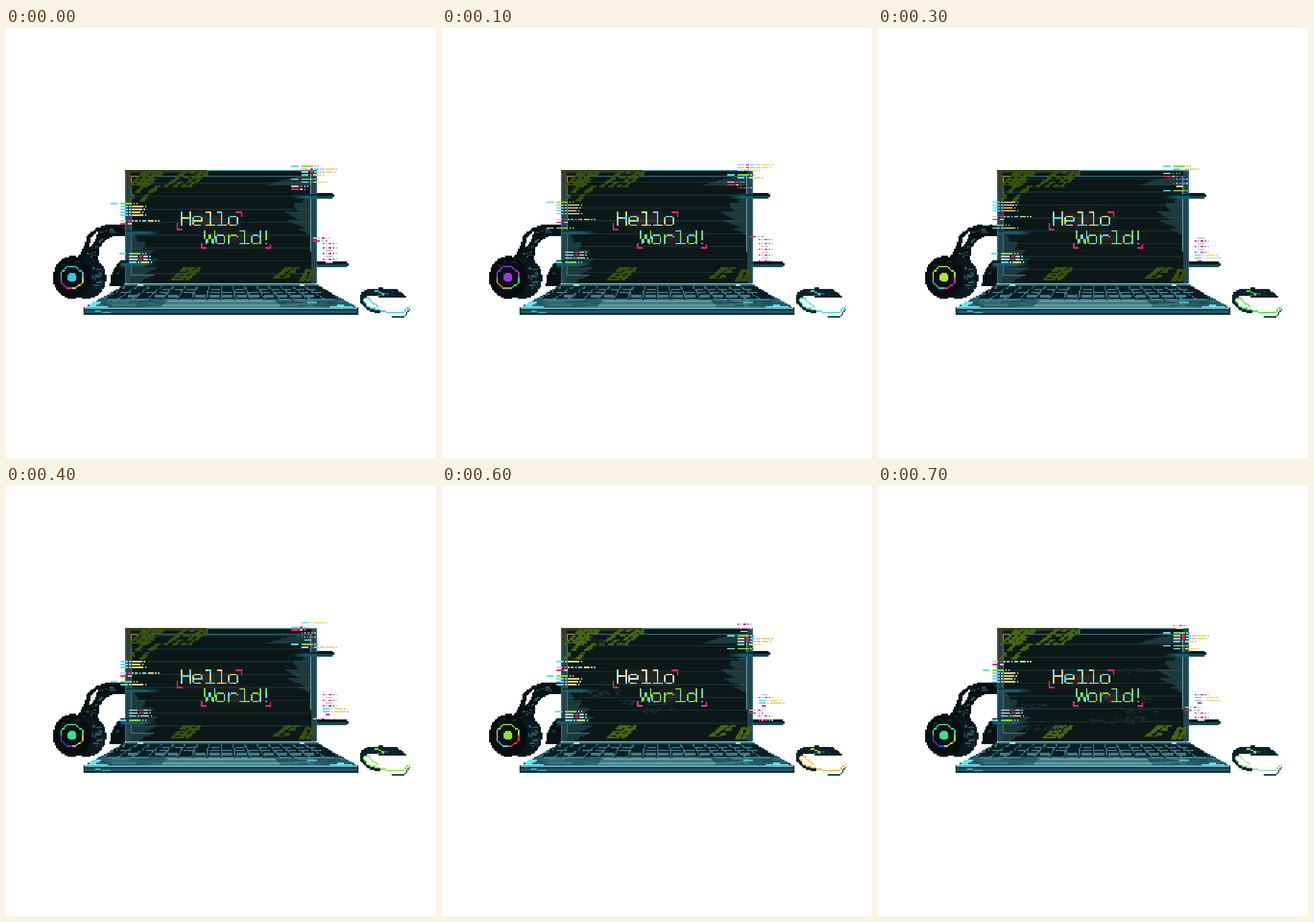
Write an HTML page with a canvas that moves like this. It is 748 by 748 pixels and loops after 0.8 s.

```html
<!DOCTYPE html>
<html lang="en">
<head>
<meta charset="utf-8">
<title>Hello World</title>
<style>
  html, body { margin: 0; width: 100%; height: 100%; overflow: hidden; background: #fff; }
  canvas { display: block; width: 100vw; height: 100vh; image-rendering: pixelated; }
</style>
</head>
<body>
<canvas id="stage" width="300" height="300" role="img" aria-label="Hello World!"></canvas>
<script>
const N = 300, U = 748 / N, STEPS = 8;
const view = document.getElementById('stage').getContext('2d');
const still = document.createElement('canvas');
still.width = still.height = N;
let g = still.getContext('2d');

let seed = 7;
const rnd = () => (seed = (seed * 16807) % 2147483647) / 2147483647;
const pick = list => list[Math.floor(rnd() * list.length)];
const cell = v => Math.round(v / U);
const dot = (c, x, y, w = 1, h = 1) => { g.fillStyle = c; g.fillRect(x, y, w, h); };
const parse = s => s.split(' ').map(p => p.split(',').map(v => v / U));

// Shapes take stage pixels and snap to the coarse grid.
function box(c, x0, y0, x1, y1) {
  const x = cell(x0), y = cell(y0);
  dot(c, x, y, Math.max(1, cell(x1) - x), Math.max(1, cell(y1) - y));
}
function spans(pts, put) {
  const ys = pts.map(p => p[1]);
  for (let y = Math.floor(Math.min(...ys)); y <= Math.max(...ys); y++) {
    const hits = [], m = y + .5;
    pts.forEach(([x0, y0], i) => {
      const [x1, y1] = pts[(i + 1) % pts.length];
      if ((y0 <= m) !== (y1 <= m)) hits.push(x0 + (m - y0) / (y1 - y0) * (x1 - x0));
    });
    hits.sort((a, b) => a - b);
    for (let i = 0; i + 1 < hits.length; i += 2) put(Math.round(hits[i]), Math.round(hits[i + 1]), y);
  }
}
const poly = (c, s) => spans(parse(s), (a, b, y) => dot(c, a, y, b - a));
// Random horizontal streaks inside a polygon.
function grain(colors, s, density, len) {
  spans(parse(s), (a, b, y) => {
    for (let x = a; x < b; x++) if (rnd() < density) {
      const w = Math.min(b - x, 1 + Math.floor(rnd() * len));
      dot(pick(colors), x, y, w);
      x += w;
    }
  });
}
function line(c, s, w = 1) {
  const pts = parse(s);
  for (let i = 1; i < pts.length; i++) {
    const [x0, y0] = pts[i - 1], [x1, y1] = pts[i];
    const n = Math.max(1, Math.ceil(Math.max(Math.abs(x1 - x0), Math.abs(y1 - y0))));
    for (let k = 0; k <= n; k++)
      dot(c, Math.floor(x0 + (x1 - x0) * k / n), Math.floor(y0 + (y1 - y0) * k / n), w, w);
  }
}
function disc(c, x, y, rx, ry = rx) {
  x /= U; y /= U; rx /= U; ry /= U;
  for (let j = Math.floor(y - ry); j <= y + ry; j++) {
    const d = 1 - ((j + .5 - y) / ry) ** 2;
    if (d <= 0) continue;
    const h = rx * Math.sqrt(d), a = Math.round(x - h);
    dot(c, a, j, Math.round(x + h) - a);
  }
}
// Slanted teeth growing from a vertical edge; a negative reach points left.
function teeth(c, x, y0, y1, reach) {
  const n = cell(y1) - cell(y0), dir = Math.sign(reach);
  for (let k = 0; k < n; k++) {
    const bulge = Math.sin(Math.PI * (k + 1) / (n + 1)), tooth = (k * .17) % 1;
    const w = cell(Math.abs(reach) * bulge * (1 - .55 * tooth));
    dot(c, dir > 0 ? cell(x) : cell(x) - w, cell(y0) + k, w);
  }
}

function headphones() {
  poly('#081115', '180,450 182,432 190,416 200,405 208,403 208,450');
  grain(['#1b3c46', '#132b33'], '186,425 197,408 208,405 208,425 195,432', .15, 4);
  poly('#081115', '122,404 136,380 141,362 155,349 174,342 208,341 208,362 186,362 173,369 163,382 160,402 168,420 130,420');
  grain(['#1d3c45', '#2c5863', '#050a0c'], '140,392 154,358 174,345 208,343 208,354 178,360 160,378 154,405', .18, 5);
  poly('#eef6f7', '147,366 154,357 161,354 157,363 150,377 144,384');
  disc('#0a181d', 140, 435, 34, 36);
  grain(['#1d3b44', '#2f5964'], '148,404 162,410 171,430 168,452 154,464 150,440', .22, 4);
  disc('#060c0f', 115, 434, 33, 37);
  grain(['#12262d', '#1b353d'], '90,420 103,405 127,404 136,410 108,410 95,424 92,445', .2, 4);
  disc('#0a1013', 114, 434, 24);
}

function screen() {
  box('#23444e', 207, 247, 541, 444);
  box('#0c1817', 217, 250, 530, 444);
  box('#467d8a', 350, 247, 541, 249.5);
  box('#2d3a14', 210, 247, 350, 252);
  for (let y = 250; y < 300; y += U)
    box(`rgba(74,58,24,${(300 - y) / 60})`, 209, y, 217, y + U);
  const shade = '#1c393e';
  poly(shade, '488,263 530,256 530,274 450,274 472,268');
  teeth(shade, 530, 288, 362, -46);
  teeth(shade, 217, 356, 460, 50);
  box('#346470', 207, 252, 209.5, 444);
  box('#346470', 538, 250, 541, 444);
  box('#3b6b77', 217, 429, 258, 432);
  box('#3b6b77', 217, 257, 219.5, 432);
  box('#2f5e6b', 230, 257, 531, 259.5);
  box('#55919e', 529, 257, 532, 389);
  box('#917b4c', 217, 257, 219.5, 272);
  box('#917b4c', 217, 257, 232, 259.5);
}

function keyboard() {
  const top = 447, low = 487, edge = y => 71 * (y - top) / (low - top);
  poly('#265d69', '206,447 542,447 613,487 135,487');
  grain(['#2e6b77', '#1f4e5a', '#3a7a85'], '165,472 583,472 608,486 142,486', .08, 20);
  poly('#0b1d24', '204,448 544,448 580,471 168,471');
  for (let y = 450; y < 470; y += 6) {
    const l = 212 - edge(y), w = 536 + edge(y) - l;
    for (let k = 0; k < 16; k++) {
      const x = l + w * k / 16;
      line('#376e79', `${x},${y} ${x + (k - 8) * .5},${y + 3}`);
      if (rnd() < .75) box('#3f7e87', x + 3, y + 3, x + w / 16 - 3, y + 5.5);
    }
  }
  poly('#3d7c83', '281,474 468,474 477,485 270,485');
  line('#75a8a9', '283,474 467,474');
  line('#699fa3', '272,482 475,482');
  poly('#6de1f1', '151,477 169,475 157,483 188,486 136,488');
  poly('#6de1f1', '557,486 579,482 598,483 613,488 550,488');
  line('#4fb6c8', '526,477 539,477');
  box('#0a2730', 135, 486, 613, 498);
  box('#68abb3', 136, 486, 612, 488.5);
  box('#225964', 138, 490, 611, 495);
  grain(['#4da9b6'], '140,490 190,490 182,495 140,495', .18, 9);
  box('#82b2b7', 209, 443, 539, 446);
  for (const x of [230, 510]) box('#9be6f0', x, 446, x + 9, 449);
}

// Dark bars sticking out of the lid, fading over the glass.
function bar(x0, x1, y, tip) {
  const reach = Math.abs(x1 - x0), dir = Math.sign(x1 - x0);
  for (let d = 0; d < reach; d += U) {
    const x = x0 + d * dir, a = Math.min(1, d / 26 + .1);
    box(`rgba(11,42,51,${a})`, x, y, x + U, y + 4);
    box(`rgba(20,92,107,${a})`, x, y + 4, x + U, y + 9);
  }
  if (!tip) return;
  box('#07161b', x1, y - 1, tip - 3, y + 4);
  box('#164852', x1, y + 4, tip - 2, y + 9);
  box('#0b252d', tip - 3, y + 2, tip, y + 7);
}

function mouse() {
  poly('#0b2027', '615,470 619,459 631,454 645,455 649,451 663,454 680,455 692,463 698,470 686,468 670,468 655,470 640,465 627,468 622,474');
  grain(['#285963', '#163941'], '621,462 636,456 663,457 688,465 660,467', .15, 4);
  line('#0b242c', '616,464 617,475 626,484 637,490 648,493', 2);
  line('#194650', '671,502 692,502 702,491');
}

headphones();
screen();
bar(496, 541, 288, 571);
bar(533, 541, 407, 596);
bar(266, 207, 351);
bar(259, 197, 404);
keyboard();
mouse();

const ink = { c: '#66d9ef', g: '#8bdc2c', y: '#e6db74', p: '#f3246f', w: '#c9caca', v: '#a66fe0' };
// Kinds of code row: colour + length in cells, or a bare gap.
const kinds = {
  G: 'c5 2 g8 1 w1 1 w1', Y: '7 c5 1 w1 1 y6 1 w1', A: 'w5 1 p2 1 w1 1 w1', P: 'p5 1 w2 1 v1',
  M: '7 w5 1 p2 1 c3 1 w3 1 y4 1 w1', L: '7 w4 1 p2 1 w1 1 c2 1 w1 1 c3 1 y4 1 w1 1 w1',
  B: '7 w6 1 p2 1 w3 1 c1', S: '7 p4 1 w3', D: '7 p1 1 w1 1 p2 1 v1 1 w1', W: '9 w5', T: '9 p3'
};
// Each block scrolls up through its rows; one letter per cell of height.
const blocks = [
  { rows: 'G.Y.Y.Y.Y...L.S...', x: 73, y: 122, top: 121, end: 139, scroll: i => i + Math.floor(10 * (i / STEPS) ** 5) },
  { rows: 'G.B.B.Y..', x: 79, y: 157, top: 156, end: 163, scroll: i => 3 * i },
  { rows: 'G.M.M.Y..G.Y..A.P.D..D.W..', x: 199, y: 96, top: 95, end: 113, scroll: i => Math.ceil(2.85 * i) },
  { rows: 'A.P.D..D.W.D.W.D.W.D.Y.Y.T..', x: 214, y: 146, top: 145, end: 163, scroll: i => Math.ceil(2.85 * i) }
];
function code(i) {
  for (const b of blocks) for (let y = b.top; y <= b.end; y++) {
    const n = b.rows.length, k = (y - b.y + b.scroll(i) + n) % n;
    let x = b.x;
    for (const run of (kinds[b.rows[k]] || '0').split(' ')) {
      const color = ink[run[0]];
      const w = color ? +run.slice(1) + (run[0] === 'y' ? k % 3 : 0) : +run;
      if (color) dot(color, x, y, w);
      x += w;
    }
  }
}

// Letter strokes: x y width height.
const glyphs = {
  H: '0 0 1 10,6 0 1 10,1 4 5 1',
  e: '1 3 5 1,0 4 1 5,6 4 1 2,1 6 6 1,1 9 5 1',
  l: '0 0 4 1,3 1 1 8,0 9 7 1',
  o: '1 3 5 1,0 4 1 5,6 4 1 5,1 9 5 1',
  W: '0 0 1 6,7 0 1 6,1 6 1 4,3 3 2 3,2 6 1 3,5 6 1 3,6 6 1 4',
  r: '0 3 1 7,1 4 1 1,2 3 4 1,6 4 1 1',
  d: '6 0 1 10,1 3 4 1,5 4 1 1,0 4 1 5,1 9 4 1,5 8 1 1',
  '!': '2 0 1 7,2 9 1 1'
};
function word(text, x0, y0, tint) {
  [...text].forEach((ch, k) => {
    for (const s of glyphs[ch].split(',')) {
      const [x, y, w, h] = s.split(' ').map(Number);
      for (let a = 0; a < w; a++) for (let b = 0; b < h; b++) {
        const px = x0 + Math.round(k * 8.25) + x + a, py = y0 + y + b;
        dot(tint(px, py), px, py);
      }
    }
  });
}
function glow(x, y, w, h, c) {
  g.save();
  g.translate(x / U, y / U);
  g.scale(w / U, h / U);
  const f = g.createRadialGradient(0, 0, 0, 0, 0, 1);
  f.addColorStop(0, c);
  f.addColorStop(1, 'transparent');
  g.fillStyle = f;
  g.fillRect(-1, -1, 2, 2);
  g.restore();
}

// A bundle of broken diagonal strips rising to the right.
function strips(c, x, y, w, h, n) {
  for (let k = 0; k < n; k++) {
    const from = x + w * .6 * k / n + rnd() * 4, run = w * .4;
    for (let d = 0; d < h; d += U) {
      const px = from + run * d / h;
      if (rnd() < .9) box(c, px, y - d, px + 5 + rnd() * 6, y - d + U);
    }
  }
}
// Corner marks: tip of the bracket and the reach of its two arms.
function corner(c, x, y, dx, dy) {
  line(c, `${x + dx},${y} ${x},${y} ${x},${y + dy}`);
}

function display(i) {
  const glitch = i === 6, olive = i > 4 ? '#466411' : '#38500e';
  seed = 21;
  strips(olive, 209, 300, 70, 26, 2);
  strips(olive, 209, 274, 66, 26, 4);
  strips(olive, 274, 275, 88, 27, 4);
  strips(olive, 285, 436, 52, 22, 4);
  strips(olive, 461, 433, 48, 18, 3);
  strips(olive, 508, 438, 32, 22, 2);
  for (let y = 269 - i * U; y < 430; y += 22.4)
    if (y > 258) box('rgba(57,105,108,.24)', 220, y, 529, y + U);
  if (i > 5) {
    seed = 90 + i;
    for (let k = 0; k < 7; k++) {
      const x = 232 + rnd() * 200, y = 262 + rnd() * 155, r = x + 50 + rnd() * 45;
      grain(['#1a2c2e'], `${x},${y} ${r},${y} ${r},${y + 10} ${x},${y + 10}`, .2, 3);
    }
  }
  glow(352, 334, 80, 30, 'rgba(230,130,105,.2)');
  glow(402, 366, 80, 30, 'rgba(190,110,100,.18)');
  const wave = (x, y) => Math.sin(x * .48 + y * .8 + i * .75);
  word('Hello', 122, 128, (x, y) => wave(x, y) > (glitch ? .7 : .1) ? ink.y : glitch && y < 136 ? '#d7f0ee' : ink.c);
  word('World!', 138, 141, (x, y) => wave(x, y) > 0 ? ink.g : ink.c);
  const low = glitch ? '#ec35bd' : ink.p;
  corner(ink.p, 410, 321, -10, 8);
  corner(ink.p, 298, 350, 8, -10);
  corner(low, 340, 383, 8, -8);
  corner(low, 460, 383, -8, -6);
}

const ringHues = [190, 275, 0, 75, 150, 130, 90, 150];
function lights(i) {
  const hue = h => `hsl(${h},75%,55%)`;
  const h = ringHues[i], spread = 130 - 7 * i;
  line(hue(h), '96,436 96,426 106,415 122,415 133,426 133,436');
  line(hue(h - spread), '133,436 133,442 122,453 115,453');
  line(hue(h + spread), '96,436 96,442 106,453 113,453');
  disc(hue(h), 114.7, 434, 8);
  const a = i < 7 ? `hsl(${190 - 24 * i},75%,58%)` : 'hsl(124,38%,75%)';
  line(a, '642,458 650,459 658,465');
  line(a, '632,469 624,469 622,475 632,486 650,491');
  line(a, '629,471 640,479 648,486');
  line(a, '650,491 661,494 691,494 702,485');
}

let last = -1;
function tick() {
  const i = Math.floor(performance.now() % 800 / 100);
  if (i !== last) {
    last = i;
    g = view;
    g.clearRect(0, 0, N, N);
    g.drawImage(still, 0, 0);
    display(i);
    lights(i);
    code(i);
  }
  requestAnimationFrame(tick);
}
tick();
</script>
</body>
</html>
```
